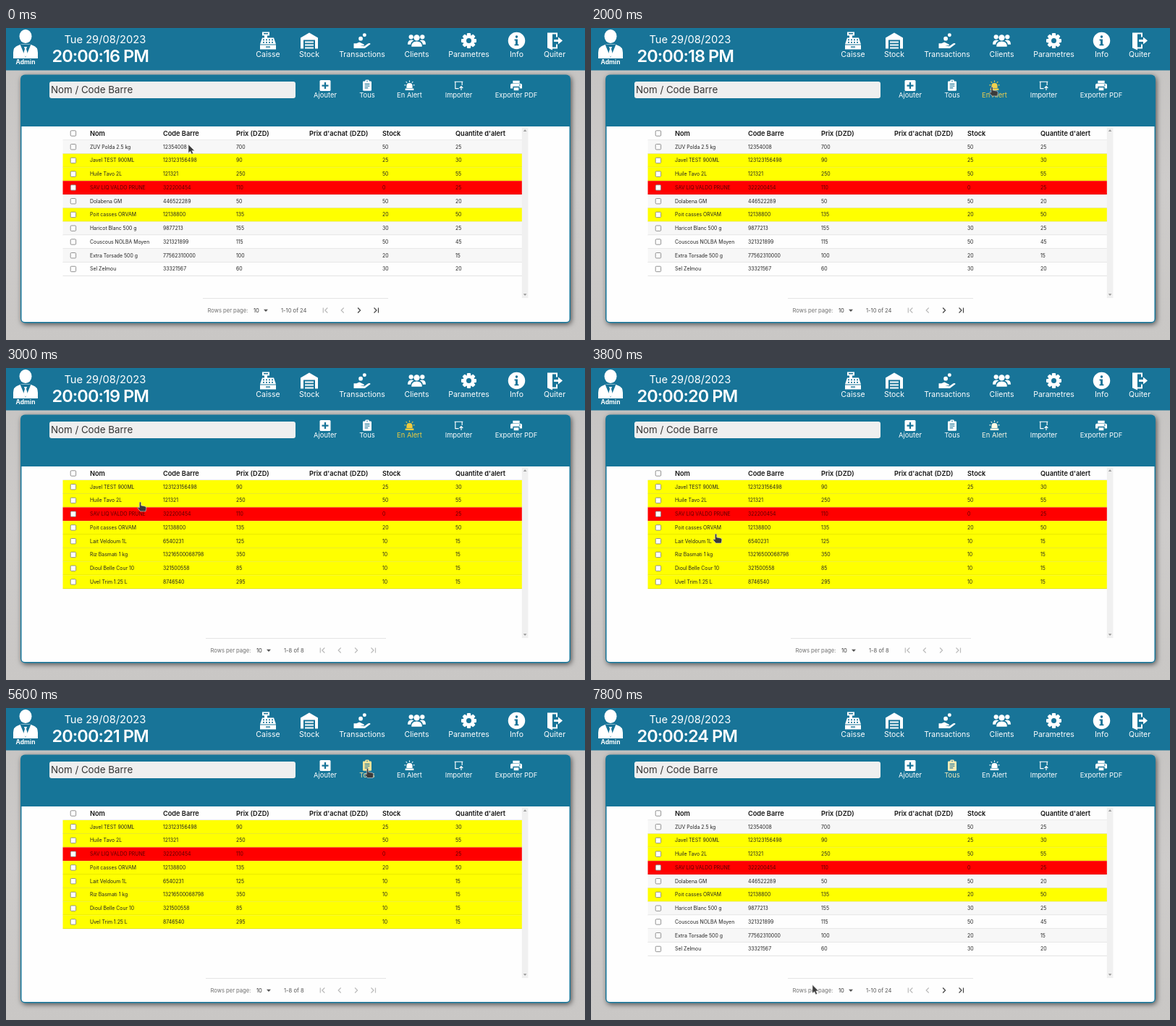
An HTML page that plays this animation: 800 px wide and 431 px high, repeating every 8000 ms.

```html
<!DOCTYPE html>
<html lang="fr">
<head>
<meta charset="utf-8">
<title>Stock</title>
<style>
html, body { margin: 0; width: 100%; height: 100%; overflow: hidden; background: #cac8c6; }
svg { display: block; width: 100%; height: 100%; }
text { font-family: Inter, "Open Sans", sans-serif; }
#clock { font-size: 23.5px; font-weight: 600; letter-spacing: -.04em; }
.nav text { font-size: 10.5px; text-anchor: middle; fill: #fff; }
.tool text { font-size: 9.4px; text-anchor: middle; }
.head text { font-size: 9.2px; font-weight: 600; fill: #151515; }
.cell text { font-size: 6.9px; fill: #222; }
.foot text { font-size: 7.6px; fill: #707070; }
.line { fill: none; stroke: currentColor; stroke-width: 2; }
</style>
</head>
<body>
<svg viewBox="0 0 800 431" preserveAspectRatio="none">
  <defs>
    <linearGradient id="wall" x2="0" y2="1">
      <stop offset="0" stop-color="#c4c2c0"/><stop offset=".5" stop-color="#cecccb"/><stop offset="1" stop-color="#c9c7c5"/>
    </linearGradient>
    <filter id="shade" x="-5%" y="-5%" width="110%" height="112%">
      <feDropShadow dx="1.5" dy="2" stdDeviation="3.5" flood-color="#000" flood-opacity=".6"/>
    </filter>
  </defs>
  <rect width="800" height="431" fill="url(#wall)"/>
  <rect width="800" height="58.5" fill="#187498"/>
  <g fill="#fff">
    <ellipse cx="27" cy="11.5" rx="8.5" ry="9.5"/>
    <path d="M10 42V34q0-8 7-10l5-2h10l5 2q7 2 7 10v8z"/>
    <path d="M19.500 22.500L27 41 34.500 22.500z" fill="#187498"/>
    <path d="M25 26h4l-1 3 2 7-3 4-3-4 2-7z"/>
    <text x="27" y="49.5" font-size="8.5" font-weight="700" text-anchor="middle">Admin</text>
    <text x="80.5" y="20.7" font-size="14.65">Tue 29/08/2023</text>
    <text id="clock" x="63.5" y="47.2"></text>
  </g>
  <g id="nav" class="nav"></g>

  <rect x="20" y="64.5" width="760" height="343" rx="6" fill="#187498" filter="url(#shade)"/>
  <path d="M21.5 136H778.5V401.500q0 4.500-4.500 4.500H26q-4.500 0-4.500-4.500z" fill="#fefefe"/>
  <rect x="60" y="74" width="340" height="23" rx="3" fill="#efefef"/>
  <text x="62" y="90.3" font-size="13.3" fill="#333">Nom / Code Barre</text>
  <g id="tools" class="tool"></g>

  <g id="head" class="head"></g>
  <g id="all" class="cell"></g>
  <g id="low" class="cell"></g>
  <rect x="712.8" y="137" width="8.6" height="236" fill="#f0f0f0"/>
  <path d="M714.8 143l2.300-3 2.300 3zM714.8 367l2.300 3 2.300-3z" fill="#a0a0a0"/>
  <g id="footAll" class="foot"></g>
  <g id="footLow" class="foot"></g>

  <g id="arrow" fill="#3b3b3b" stroke="#ddd" stroke-width=".6">
    <path d="M0 0V11.500L2.700 9.200 4.500 13.200 6.600 12.200 4.800 8.400H8.400z"/>
  </g>
  <g id="hand" fill="#3b3b3b" stroke="#ddd" stroke-width=".6">
    <path d="M-1.200 1Q0-.8 1.200 1V5L6.500 6Q8.500 6.500 8.300 8.500L7.500 13H0L-3.600 8.500Q-3.500 6.800-1.200 8z"/>
  </g>
</svg>
<script>
const $ = id => document.getElementById(id);
const text = (x, y, s, extra = '') => `<text x="${x}" y="${y}" ${extra}>${s}</text>`;
// Icons live on a 24 unit grid; {c} is the cut-out colour.
const icon = (x, y, size, body) =>
  `<g transform="translate(${x - size / 2} ${y - size / 2}) scale(${size / 24})">${body.replaceAll('{c}', '#187498')}</g>`;
const spot = (x, y, w, h) => `<rect x="${x}" y="${y}" width="${w}" height="${h}" fill="{c}"/>`;

const people = '<circle cx="12" cy="8" r="4"/><circle cx="4.5" cy="7" r="3"/><circle cx="19.5" cy="7" r="3"/>' +
  '<path d="M5 20q0-7 7-7t7 7zM0 17q0-6 5-6 2 0 3 1-4 2-4 5zM24 17q0-6-5-6-2 0-3 1 4 2 4 5z"/>';
const till = '<path d="M4 0h10v5h-3v3h9l3 9H1l3-9h3V5H4zM1 18h22v6H1z"/>' + spot(6, 1.5, 6, 1.5) +
  [6, 10, 14, 18].map(x => spot(x - 1, 10, 2, 1.7) + spot(x - 1, 13.5, 2, 1.7)).join('') + spot(9, 20, 6, 1.4);
const depot = '<path d="M0 8L12 1 24 8V23H20V11H4V23H0zM6 13H18V15H6zM6 17H18V19H6zM6 21H18V23H6z"/>';
const coins = '<path d="M0 16h4l4-2 6 3q2 1 1 2H9l6 1 6-4q3-1 3 1l-8 6H0z"/>' +
  '<circle cx="10" cy="9" r="3"/><circle cx="15.5" cy="4" r="2.6"/>';
const gear = [0, 45, 90, 135].map(a =>
  `<rect x="9" y="0" width="6" height="24" rx="1.5" transform="rotate(${a} 12 12)"/>`).join('') +
  '<circle cx="12" cy="12" r="9"/><circle cx="12" cy="12" r="4" fill="{c}"/>';
const info = '<circle cx="12" cy="12" r="12"/><circle cx="12" cy="6.5" r="1.8" fill="{c}"/>' +
  '<path d="M9 10h4.500v7H15v2H9v-2h1.500v-5H9z" fill="{c}"/>';
const exit = '<path d="M2 1H16V7H14V3H9V21h5V17h2V23H9V25L2 22zM17 7l6 5-6 5V13.500H11V10.500h6z"/>';

const nav = [['Caisse', 362, till, 24], ['Stock', 419, depot, 24], ['Transactions', 492, coins, 23],
  ['Clients', 567.5, people, 25], ['Parametres', 639.5, gear, 21], ['Info', 705.5, info, 23.5],
  ['Quiter', 758, exit, 24]];
$('nav').innerHTML = nav.map(([s, x, body, size]) =>
  `<g fill="#fff">${icon(x, 17.5, size, body)}</g>` + text(x, 40.2, s)).join('');

const plus = '<rect x="2" y="2" width="20" height="20" rx="2"/>' +
  '<path d="M10.500 6h3v4.500H18v3h-4.500V18h-3v-4.500H6v-3h4.500z" fill="{c}"/>';
const clip = '<rect x="3" y="3" width="18" height="20" rx="2"/><rect x="8" y="0" width="8" height="6" rx="2"/>' +
  spot(7, 8, 10, 1.8) + spot(7, 12, 10, 1.8) + spot(7, 16, 7, 1.8) + spot(11, 2, 2, 2);
const siren = '<path d="M5 18V13a7 7 0 0 1 14 0V18zM2 19H22V23H2zM11 0h2v4h-2zM3 3L4.500 2 7 5 5.500 6z' +
  'M21 3L19.500 2 17 5 18.500 6zM0 10h3v2H0zM21 10h3v2h-3z"/>';
const load = '<path class="line" d="M20 11V3H4V19H12M18 23V14M14 18l4-4 4 4M2 3H22"/>';
const print = '<path d="M5 2H19V7H5zM3 8H21q3 0 3 3V18H19V14H5V18H0V11q0-3 3-3zM7 16H17V22H7z"/>' + spot(18, 10, 2.5, 2);
const tools = [['Ajouter', 441, plus, 18], ['Tous', 499, clip, 16], ['En Alert', 557.5, siren, 14],
  ['Importer', 625.5, load, 14], ['Exporter PDF', 705, print, 16]];
$('tools').innerHTML = tools.map(([s, x, body, size], i) =>
  `<g id="tool${i}" fill="currentColor" color="#fff">${icon(x, 79.5, size, body)}${text(x, 96.3, s)}</g>`).join('');

const cols = [116, 217, 318, 419, 520, 621];
const box = y => `<rect x="89.2" y="${y - 3.7}" width="7.4" height="7.4" rx="1.2" fill="#fff" stroke="#777" stroke-width=".8"/>`;
$('head').innerHTML = box(145.5) + ['Nom', 'Code Barre', 'Prix (DZD)', "Prix d'achat (DZD)", 'Stock', "Quantite d'alert"]
  .map((s, i) => text(cols[i], 148.9, s)).join('') + '<path d="M78.5 154.7H713" stroke="#e0e0e0" stroke-width=".7"/>';

// name | code | price | stock | alert level
const bleach = 'Javel TEST 900ML|123123156498|90|25|30', oil = 'Huile Tavo 2L|121321|250|50|55',
  soap = 'SAV LIQ VALDO PRUNE|322200454|110|0|25', peas = 'Poit casses ORVAM|12138800|135|20|50';
const stock = ['ZUV Polda 2.5 kg|12354008|700|50|25', bleach, oil, soap, 'Dolabena GM|446522289|50|50|20', peas,
  'Haricot Blanc 500 g|9877213|155|30|25', 'Couscous NOLBA Moyen|321321899|115|50|45',
  'Extra Torsade 500 g|77562310000|100|20|15', 'Sel Zelmou|33321567|60|30|20'];
const alerts = [bleach, oil, soap, peas, 'Lait Veldoum 1L|6540231|125|10|15', 'Riz Basmati 1 kg|13216500068798|350|10|15',
  'Dioul Belle Cour 10|321500558|85|10|15', 'Uvel Trim 1.25 L|8746540|295|10|15'];

function row(line, i) {
  const [name, code, price, left, min] = line.split('|');
  const y = 155 + i * 18.75, mid = y + 9.2;
  const fill = +left === 0 ? '#f00' : +left < +min ? '#ff0' : i % 2 ? '#fefefe' : '#f7f7f7';
  const ink = +left === 0 ? 'style="fill:#580000"' : '';
  return `<rect x="78.5" y="${y}" width="634.5" height="18.75" fill="${fill}"/>` +
    `<path d="M78.5 ${y + 18.5}H713" stroke="#000" stroke-opacity=".16" stroke-width=".7"/>` + box(mid) +
    [name, code, price, '', left, min].map((s, c) => s && text(cols[c], mid + 2.3, s, ink)).join('');
}
$('all').innerHTML = stock.map(row).join('');
$('low').innerHTML = alerts.map(row).join('');

function footer(x, range, end, first, next) {
  const glyphs = ['M-3-3.500V3.500M3-3.500L-.5 0 3 3.500', 'M2-3.500L-1.500 0 2 3.500',
    'M-2-3.500L1.500 0-2 3.500', 'M-3-3.500L.5 0-3 3.500M3-3.500V3.500'];
  return `<path d="M${x - 6.5} 373.5H${end}" stroke="#ddd" stroke-width=".8"/>` +
    text(x, 392.5, 'Rows per page:') + text(x + 63.5, 393, '10', 'style="fill:#333"') +
    `<path d="M${x + 77.5} 388.7h6l-3 3.200z" fill="#555"/>` + text(x + 101.5, 392.5, range, 'style="fill:#555"') +
    glyphs.map((d, i) => `<path transform="translate(${first + i * 23.4} 390)" d="${d}" fill="none" ` +
      `stroke="${next && i > 1 ? '#444' : '#bbb'}" stroke-width="1.2"/>`).join('');
}
$('footAll').innerHTML = footer(278.5, '1-10 of 24', 528, 441.3, true);
$('footLow').innerHTML = footer(282.5, '1-8 of 8', 525, 437.3, false);

const LOOP = 8000, STEP = 200;
const path = [[0, 252, 161], [400, 252, 161], [1400, 554, 81], [2400, 554, 81], [3000, 185.5, 185], [3800, 172.5, 229],
  [4400, 172.5, 229], [5200, 499.5, 83.5], [6800, 499.5, 83.5], [7800, 306, 382.5]];
const ramp = (t, a, b) => {
  const p = Math.min(1, Math.max(0, (t - a) / (b - a)));
  return p * p * (3 - 2 * p);
};
const show = (id, on) => $(id).setAttribute('visibility', on ? 'visible' : 'hidden');
const tint = (id, p) => $(id).setAttribute('color',
  `rgb(${[238, 201, 50].map(c => Math.round(255 + (c - 255) * p)).join()})`);

function pointer(t) {
  let i = 1;
  while (i < path.length - 1 && path[i][0] < t) i++;
  const [a, x, y] = path[i - 1], [b, u, v] = path[i], p = ramp(t, a, b);
  return `translate(${x + (u - x) * p} ${y + (v - y) * p})`;
}

function draw(t) {
  $('clock').textContent = `20:00:${16 + Math.floor((t + 200) / 1000)} PM`;
  const low = t >= 2400 && t < 6000, hand = t >= 1400 && t < 7200;
  show('low', low); show('footLow', low);
  show('all', !low); show('footAll', !low);
  tint('tool1', ramp(t, 5200, 6000) - ramp(t, 7200, 8200));
  tint('tool2', ramp(t, 1300, 2200) - ramp(t, 2800, 4100));
  show('hand', hand); show('arrow', !hand);
  $(hand ? 'hand' : 'arrow').setAttribute('transform', pointer(t));
}

// The screen refreshes five times a second.
function tick(now) {
  draw(Math.floor(now % LOOP / STEP) * STEP);
  requestAnimationFrame(tick);
}
draw(0);
requestAnimationFrame(tick);
</script>
</body>
</html>
```
